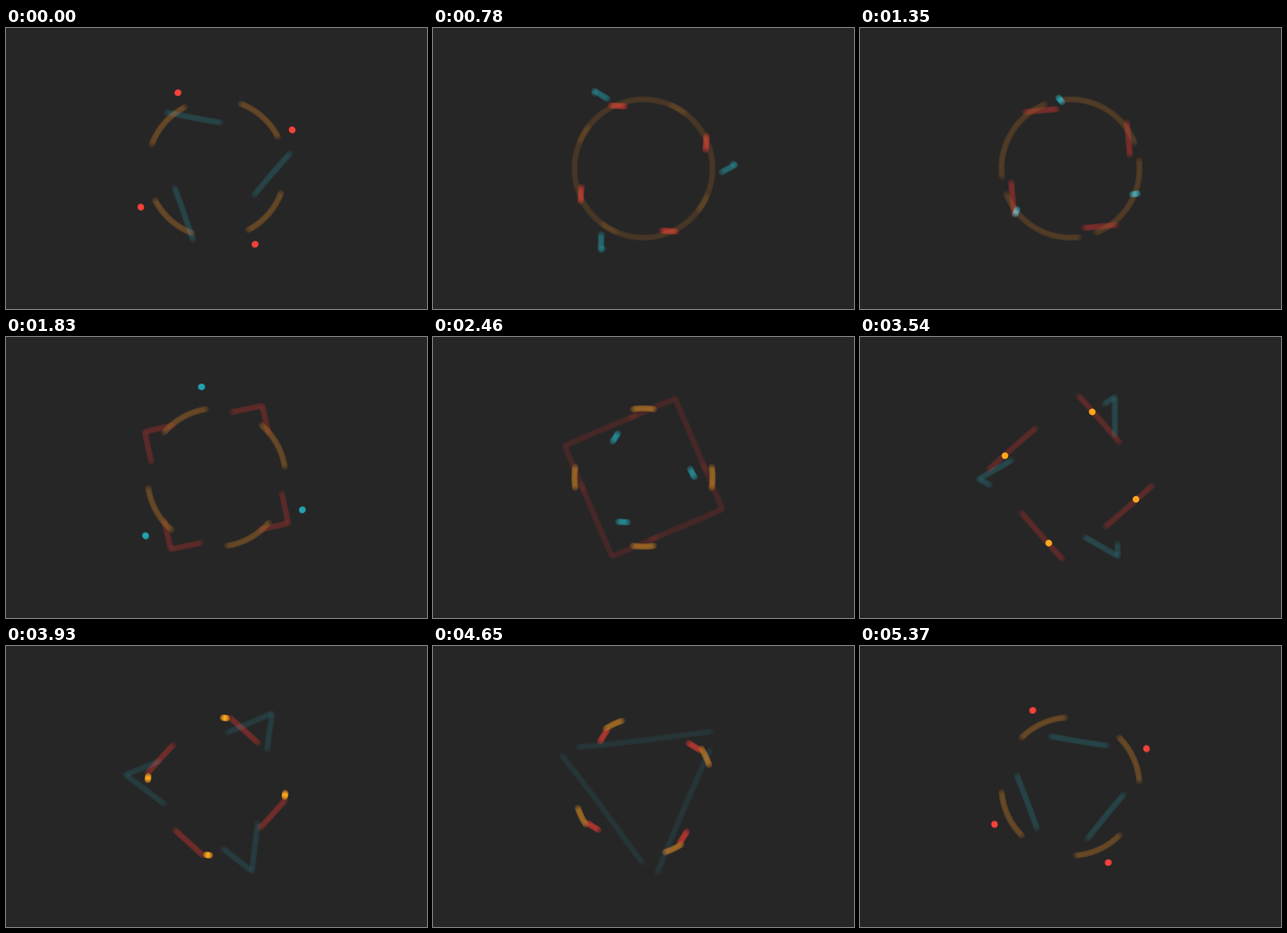
Animation of 660 by 440 pixels, one loop 5400 ms. Source, as an HTML page with a canvas:

```html
<!DOCTYPE html>
<html lang="en">
<head>
<meta charset="utf-8">
<title>Orbiting dots</title>
<style>
  html, body { margin: 0; width: 100%; height: 100%; overflow: hidden; background: #262626; }
  canvas { position: absolute; left: 170px; top: 60px; }
</style>
</head>
<body>
<canvas width="320" height="320"></canvas>
<script>
const SIZE = 320, MID = SIZE / 2;
const LOOP = 5400, STEP = 30, SHUTTER = 54, SAMPLES = 160;
const LAPS = 10, DOT = 5, GAMMA = 2.2, TAU = Math.PI * 2;

const linear = rgb => rgb.map(v => (v / 255) ** GAMMA);
const BACK = 38, back = linear([BACK, BACK, BACK]);

// start: angle of the first corner in degrees; turn: degrees per loop; rest: when the dots stand still
const shapes = [
  { n: 4, radius: 108.2, start: 18, turn: 0, rest: 3600, color: [251, 166, 26], round: true },
  { n: 4, radius: 133.2, start: -27, turn: -90, rest: 0, color: [245, 67, 58] },
  { n: 3, radius: 144, start: -50, turn: 120, rest: 1800, color: [34, 164, 176] }
];
for (const s of shapes) s.tint = linear(s.color).map((v, i) => v - back[i]);

const ctx = document.querySelector('canvas').getContext('2d');
const image = ctx.createImageData(SIZE, SIZE);
const light = new Float32Array(SIZE * SIZE * 3);

// cubic-bezier(2/3, 0, 1/3, 1)
function ease(u) {
  let lo = 0, hi = 1;
  for (let i = 0; i < 24; i++) {
    const s = (lo + hi) / 2;
    if (2 * s - 3 * s * s + 2 * s ** 3 < u) lo = s; else hi = s;
  }
  return lo * lo * (3 - 2 * lo);
}

function polar(radius, angle) {
  return [MID + radius * Math.sin(angle), MID - radius * Math.cos(angle)];
}

// Place on the outline, counted in sides from the first corner
function place(shape, side, turn) {
  const at = k => polar(shape.radius, turn + k * TAU / shape.n);
  if (shape.round) return at(side);
  const k = Math.floor(side), f = side - k;
  const a = at(k), b = at(k + 1);
  return [a[0] + (b[0] - a[0]) * f, a[1] + (b[1] - a[1]) * f];
}

function addDot([cx, cy], tint) {
  const reach = DOT + 1;
  for (let y = Math.floor(cy - reach); y <= cy + reach; y++) {
    for (let x = Math.floor(cx - reach); x <= cx + reach; x++) {
      const cover = DOT + 0.5 - Math.hypot(x + 0.5 - cx, y + 0.5 - cy);
      if (cover <= 0) continue;
      const weight = Math.min(1, cover) / SAMPLES, p = (y * SIZE + x) * 3;
      for (let c = 0; c < 3; c++) light[p + c] += weight * tint[c];
    }
  }
}

function addMoment(t) {
  for (const s of shapes) {
    const u = ((t - s.rest) / LOOP % 1 + 1) % 1;
    const turn = (s.start + s.turn * t / LOOP) * TAU / 360;
    const side = -ease(u) * LAPS * s.n;
    for (let j = 0; j < s.n; j++) addDot(place(s, side + j, turn), s.tint);
  }
}

function draw(t) {
  light.fill(0);
  for (let i = 0; i < SAMPLES; i++) {
    addMoment(t + ((i + 0.5) / SAMPLES - 0.5) * SHUTTER);
  }
  for (let p = 0; p < SIZE * SIZE; p++) {
    for (let c = 0; c < 3; c++) {
      const v = light[p * 3 + c];
      image.data[p * 4 + c] = v ? 255 * Math.max(0, back[c] + v) ** (1 / GAMMA) : BACK;
    }
    image.data[p * 4 + 3] = 255;
  }
  ctx.putImageData(image, 0, 0);
}

const begin = performance.now();
let shown = -1;
function tick() {
  const t = Math.floor(Math.max(0, performance.now() - begin) % LOOP / STEP) * STEP;
  if (t !== shown) draw(shown = t);
  requestAnimationFrame(tick);
}
tick();
</script>
</body>
</html>
```
